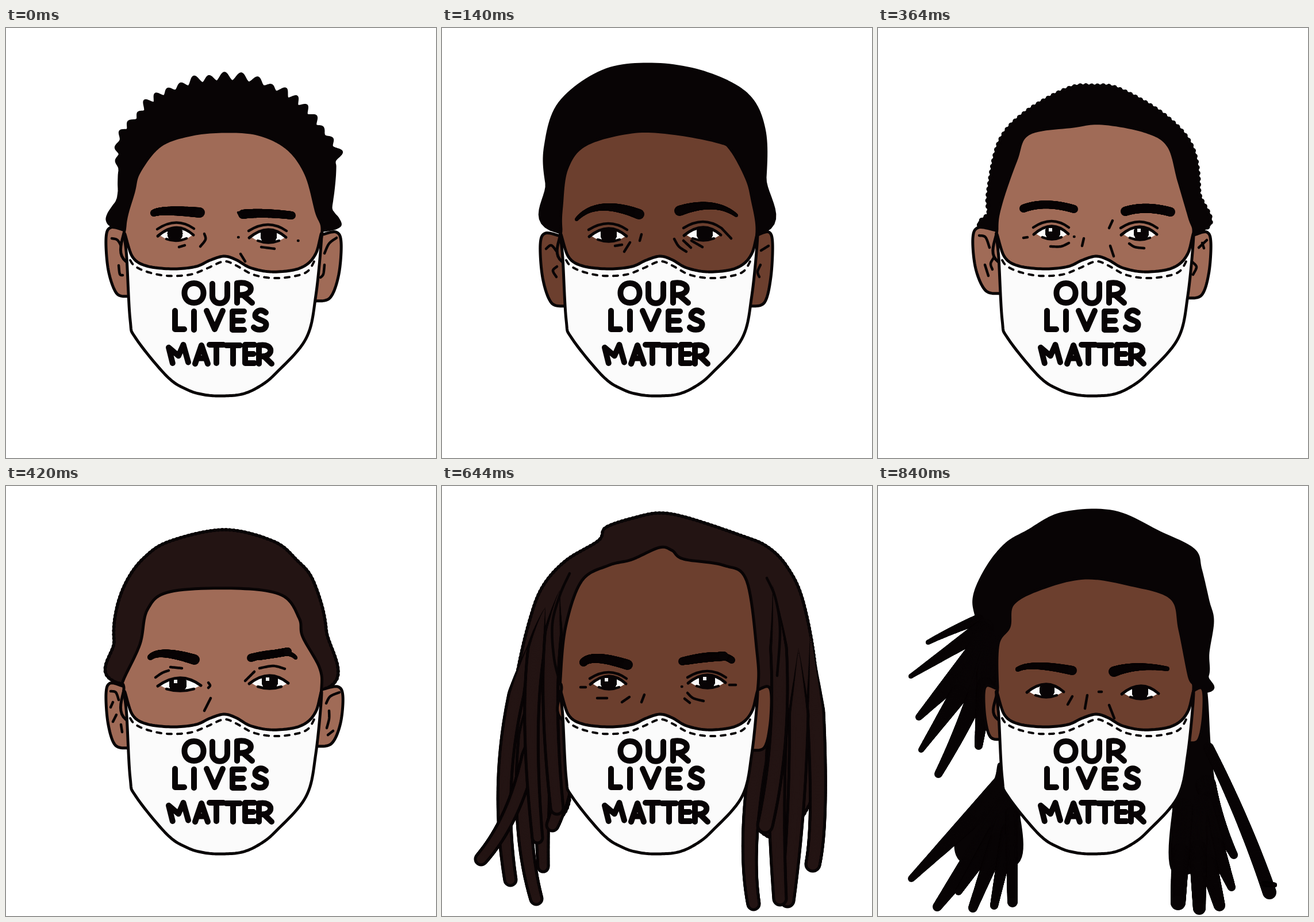
Recreate the animation shown at these times as an HTML page with a canvas. Size 748 px wide and 748 px high, loop 980 ms.

```html
<!DOCTYPE html>
<html lang="en">
<head>
<meta charset="utf-8">
<title>Our lives matter</title>
<style>
html, body { margin: 0; width: 100%; height: 100%; overflow: hidden; background: #fff; }
canvas { display: block; width: 748px; height: 748px; }
</style>
</head>
<body>
<canvas id="stage" width="748" height="748" role="img" aria-label="Masked faces: OUR LIVES MATTER"></canvas>
<script>
const ctx = document.getElementById('stage').getContext('2d');
const INK = '#080405', LIGHT = '#a06b57', DARK = '#6c3f2e', BROWN = '#231413';
const HOLD = 140;
let skin = LIGHT;

const parse = s => s.trim().split(/\s+/).map(p => p.split(',').map(Number));

// Dense samples of a smooth curve through the points
function sample(p, closed) {
  const n = p.length, out = [];
  const at = i => closed ? p[(i + n) % n] : p[Math.max(0, Math.min(n - 1, i))];
  for (let i = 0; i < (closed ? n : n - 1); i++) {
    const [a, b, c, d] = [at(i - 1), at(i), at(i + 1), at(i + 2)];
    for (let k = 0; k < 12; k++) {
      const t = k / 12;
      out.push([0, 1].map(j => b[j] + t / 2 * (c[j] - a[j] + t * (2 * a[j] - 5 * b[j] + 4 * c[j] - d[j]
        + t * (3 * b[j] - a[j] - 3 * c[j] + d[j])))));
    }
  }
  if (!closed) out.push(p[n - 1]);
  return out;
}

function trace(list, closed) {
  const path = new Path2D();
  list.forEach(q => path.lineTo(...q));
  if (closed) path.closePath();
  return path;
}

function stroke(path, width, dash = []) {
  ctx.lineWidth = width;
  ctx.strokeStyle = INK;
  ctx.setLineDash(dash);
  ctx.stroke(path);
  ctx.setLineDash([]);
}

function blob(path, color) {
  ctx.fillStyle = color;
  ctx.fill(path);
  stroke(path, 5);
}

function hair(s, color = INK, curl = 0) {
  const path = trace(sample(parse(s), true), true);
  blob(path, color);
  if (curl) stroke(path, curl, [.1, curl * 1.1]);
}

// Hair whose edge rises in seeded tufts above a height limit
function tufts(s, step, amp, limit, seed) {
  const list = sample(parse(s), true), out = [];
  const rnd = () => (seed = seed * 16807 % 2147483647) / 2147483647;
  let walked = 0, up = false;
  list.forEach(([x, y], i) => {
    const [nx, ny] = list[(i + 1) % list.length];
    const dx = nx - x, dy = ny - y, len = Math.hypot(dx, dy);
    walked += len;
    if (walked < step) return;
    walked = 0;
    up = !up;
    const h = up && y < limit ? amp * (.5 + rnd() * .7) : 0;
    out.push([x + dy / len * h, y - dx / len * h]);
  });
  blob(trace(sample(out, true), true), INK);
}

// Tapered stroke along a quadratic curve, radius r1 to r2
function taper(x1, y1, cx, cy, x2, y2, r1, r2, color = INK, lead = 0) {
  ctx.fillStyle = color;
  for (let i = 0; i <= 150; i++) {
    const t = i / 150, u = 1 - t;
    const r = (r1 + (r2 - r1) * t) * (lead ? Math.min(1, t / lead) : 1);
    ctx.beginPath();
    ctx.arc(u * u * x1 + 2 * u * t * cx + t * t * x2, u * u * y1 + 2 * u * t * cy + t * t * y2, r, 0, 7);
    ctx.fill();
  }
}

function strand(x1, y1, x2, y2, r1, r2, bow = 0) {
  taper(x1, y1, (x1 + x2) / 2 + bow, (y1 + y2) / 2, x2, y2, r1, r2);
}

function lock(x1, y1, cx, cy, x2, y2, r1, r2) {
  taper(x1, y1, cx, cy, x2, y2, r1 + 2.5, r2 + 2.5, INK, .25);
  taper(x1, y1, cx, cy, x2, y2, r1 - 2.5, r2 - 2.5, BROWN, .25);
}

function ear(x, y, out, bx, by) {
  const h = by - y, w = x - out;
  const p = [[x, y], [out + w * .25, y - 5], [out, y + h * .12], [out + w * .12, y + h * .6], [out + w * .55, y + h * .95], [bx, by]];
  blob(trace(sample(p)), skin);
}

function face(s) {
  blob(trace(sample(parse(s + ' 540,400 520,430 379,430 215,410'), true), true), skin);
}

function mark(...s) {
  for (const m of s) {
    const p = parse(m);
    if (!p[1]) p.push([p[0][0] + .5, p[0][1]]);
    stroke(trace(sample(p)), 4.5);
  }
}

function arc(x1, y1, cx, cy, x2, y2, path = new Path2D()) {
  path.moveTo(x1, y1);
  path.quadraticCurveTo(cx, cy, x2, y2);
  return path;
}

// Almond eye with lids; fold is the height of the crease, 0 for none
function eye(x1, y1, x2, y2, ix, r, fold, shine) {
  const mx = (x1 + x2) / 2, my = (y1 + y2) / 2;
  const white = arc(x1, y1, mx, my - 24, x2, y2);
  white.quadraticCurveTo(mx, my + 20, x1, y1);
  ctx.save();
  ctx.clip(white);
  ctx.fillStyle = '#fbfbfb';
  ctx.fillRect(x1, my - 30, x2 - x1, 60);
  taper(ix, my - 3, ix, my - 3, ix, my - 3, r, r);
  if (shine) taper(ix - 4, my - 7, ix - 4, my - 7, ix - 4, my - 7, 3, 3, '#eee');
  ctx.restore();
  stroke(arc(x1 - 4, y1 + 1, mx, my - 27, x2 + 1, y2), 5);
  stroke(arc(x1 + 11, y1 + 6, mx, my + 13, x2 - 11, y2 + 6), 4.5);
  if (fold) stroke(arc(x1 - 5, y1 - fold + 2, mx, my - fold - 20, x2 + 2, y2 - fold + 2), 4.5);
}

function tousled() {
  skin = LIGHT;
  tufts('204,350 197,290 198,235 201,192 222,167 250,137 285,114 330,99 380,93 435,98 480,117 515,143 545,178 567,207 572,245 565,310 552,352', 10, 12, 235, 77);
  ear(207, 352, 174, 212, 467);
  ear(548, 360, 583, 538, 475);
  mark('184,366 194,369 201,382 203,397', '196,413 198,428 203,430', '575,365 562,375 554,392', '554,412 552,428 547,434');
  face('207,345 222,285 232,250 268,205 320,186 380,180 440,185 490,210 522,255 540,320 550,350');
  taper(257, 322, 270, 315, 337, 321, 6, 9);
  taper(412, 324, 445, 320, 497, 326, 8, 7);
  mark('404,321 408,328');
  eye(268, 361, 325, 360, 294, 13, 13);
  eye(427, 364, 486, 364, 457, 14, 13);
  mark('301,381 311,378', '345,358 347,368 338,380', '444,381 467,384', '508,370', '404,364', '408,393 416,406');
}

function flatTop() {
  skin = DARK;
  hair('203,355 182,270 180,205 205,130 280,75 365,63 455,77 530,115 560,175 562,260 549,358');
  ear(206, 362, 171, 214, 484);
  ear(549, 360, 575, 536, 484);
  mark('181,384 190,378 199,388', '200,415 193,422 199,433', '555,387 568,379', '554,412 549,424 552,433');
  face('207,350 208,310 217,245 250,203 330,181 400,183 480,198 503,212 530,262 540,300 548,350');
  taper(234, 333, 268, 295, 343, 324, 3, 9);
  taper(413, 318, 475, 297, 512, 326, 9, 3);
  eye(260, 362, 320, 362, 290, 14, 13);
  eye(425, 360, 484, 360, 457, 14, 14);
  mark('301,379 313,377', '317,389 327,373', '347,359 344,370', '487,349 503,366', '404,367 412,380 425,389', '420,370 433,382', '434,370 453,381');
}

function closeCrop() {
  skin = LIGHT;
  hair('205,350 193,320 193,280 212,197 257,147 330,106 375,101 420,107 498,152 546,207 558,285 550,355', INK, 9);
  ear(205, 352, 165, 212, 462);
  ear(550, 360, 579, 538, 470);
  mark('176,361 187,364 194,382', '201,400 196,410 199,420', '186,412 192,431', '572,369 558,382', '564,374 567,383', '548,408 554,416 548,429');
  face('207,350 214,305 240,230 262,184 340,171 390,166 465,180 505,205 523,265 542,330 549,355');
  taper(253, 314, 290, 300, 341, 315, 7, 7);
  taper(430, 319, 465, 308, 509, 320, 8, 8);
  eye(275, 358, 330, 358, 304, 13, 13, true);
  eye(427, 359, 484, 359, 458, 13, 13, true);
  mark('253,365 260,364', '300,380 318,380 332,374', '341,363', '358,366 355,379', '402,348 408,335', '404,379 410,397', '437,375 447,381 463,383');
}

function rounded() {
  skin = LIGHT;
  hair('203,345 188,270 192,215 210,165 240,125 285,96 380,76 465,96 505,128 535,166 557,250 549,355', BROWN, 6);
  ear(203, 348, 174, 214, 456);
  ear(550, 354, 586, 540, 453);
  mark('182,357 191,359 196,372', '186,376 182,385', '192,398 186,410', '200,415 202,428', '580,359 564,366 557,378', '562,391 562,405 558,421', '569,426 560,433');
  face('205,350 204,338 233,275 246,215 285,184 400,178 480,190 510,230 516,262 545,315 549,350');
  taper(251, 298, 266, 283, 328, 302, 5, 9);
  taper(426, 299, 490, 281, 504, 299, 7, 3);
  taper(440, 296, 475, 291, 490, 288, 7, 7);
  eye(268, 347, 338, 347, 299, 15, 0, true);
  eye(427, 343, 490, 343, 459, 14, 0, true);
  mark('260,333 272,325 283,321', '286,315 306,317', '352,342 355,347 352,351', '345,391 356,369', '416,339 432,323', '441,317 465,313 485,318');
}

function longLocks() {
  skin = DARK;
  hair('210,400 222,545 180,590 122,565 106,480 130,330 152,235 175,175 215,130 272,95 285,72 335,55 380,47 430,56 520,86 565,105 600,140 628,200 650,320 657,480 636,560 585,615 532,560 550,400', BROWN, 6);
  lock(160, 255, 85, 470, 119, 685, 14, 10);
  lock(165, 320, 120, 560, 164, 718, 16, 10);
  lock(185, 290, 170, 500, 176, 662, 18, 9);
  lock(165, 390, 145, 560, 68, 649, 13, 10);
  lock(180, 210, 140, 340, 166, 612, 16, 9);
  lock(215, 330, 230, 500, 192, 590, 20, 10);
  lock(205, 180, 175, 320, 200, 560, 15, 11);
  lock(640, 250, 665, 560, 645, 658, 15, 12);
  lock(620, 280, 625, 520, 601, 721, 18, 11);
  lock(590, 300, 575, 500, 588, 718, 18, 11);
  lock(570, 370, 520, 600, 542, 727, 16, 10);
  lock(575, 170, 605, 400, 562, 590, 14, 13);
  mark('222,152 205,190 192,240 195,300 206,345', '565,160 580,195 588,250 583,330');
  ear(551, 354, 573, 540, 460);
  face('208,350 206,335 215,245 243,165 290,138 330,128 378,107 400,112 420,127 490,138 530,165 548,290 550,345');
  taper(246, 307, 260, 291, 323, 311, 7, 9);
  taper(418, 305, 485, 287, 504, 303, 7, 6);
  taper(425, 304, 460, 298, 490, 296, 7, 8);
  eye(262, 344, 319, 344, 290, 14, 11, true);
  eye(432, 342, 492, 342, 461, 14, 11, true);
  mark('241,350 250,350', '270,369 287,369', '313,376 326,367', '347,376 352,363', '500,346 511,346', '417,349', '427,360 437,369 455,374', '422,370 431,377');
}

function windswept() {
  skin = LIGHT;
  tufts('205,352 193,310 190,250 180,222 179,190 192,150 215,115 245,88 290,62 345,45 400,46 450,58 495,79 530,110 561,138 574,185 573,240 563,290 552,345', 13, 8, 270, 31);
  strand(185, 190, 156, 214, 14, 4);
  strand(210, 125, 182, 138, 12, 4);
  strand(262, 85, 252, 62, 16, 7);
  strand(345, 45, 350, 30, 8, 3);
  ear(207, 346, 178, 212, 452);
  ear(549, 357, 575, 538, 459);
  face('210,350 214,260 235,190 275,155 355,147 440,150 500,175 525,195 528,230 541,320 549,350');
  taper(260, 299, 300, 285, 335, 303, 4, 9);
  taper(420, 308, 455, 292, 496, 302, 8, 4);
  eye(265, 348, 325, 348, 294, 14, 14);
  eye(427, 347, 490, 347, 460, 14, 0);
  mark('450,323 475,325 490,335 498,343', '239,352 248,354', '243,364 252,359', '264,356 270,360', '357,338 360,345 356,349', '342,397 352,371', '502,354 516,351', '504,359 513,364', '410,385 415,402');
}

function ponytails() {
  skin = DARK;
  hair('205,350 195,300 172,230 168,190 191,140 223,101 260,79 320,48 410,45 490,81 549,111 561,145 574,200 582,235 574,290 573,330 549,360');
  strand(175, 232, 87, 272, 9, 4, -6);
  strand(185, 247, 57, 331, 16, 4);
  strand(190, 275, 71, 402, 25, 6);
  strand(190, 290, 75, 459, 24, 5);
  strand(195, 300, 105, 501, 20, 7, 10);
  strand(190, 320, 175, 452, 18, 7);
  hair('214,485 200,520 140,600 150,655 242,655 243,565');
  strand(222, 520, 58, 683, 22, 6);
  strand(222, 570, 103, 732, 26, 8);
  strand(222, 580, 140, 706, 18, 6);
  strand(222, 585, 165, 734, 18, 8);
  strand(228, 600, 202, 730, 14, 7);
  strand(232, 570, 234, 724, 11, 9);
  hair('518,540 545,440 568,350 577,460 590,570 598,640 514,670');
  strand(575, 455, 681, 707, 9, 12, 10);
  strand(672, 692, 690, 694, 5, 4);
  strand(570, 520, 619, 642, 18, 7, -8);
  strand(560, 560, 615, 698, 24, 7);
  strand(553, 580, 594, 730, 22, 10);
  strand(555, 580, 559, 735, 18, 11);
  strand(530, 560, 522, 725, 18, 13);
  ear(205, 352, 184, 214, 441);
  ear(549, 356, 567, 541, 447);
  face('208,350 209,275 228,245 235,205 285,178 360,160 440,172 510,195 525,250 541,330 549,350');
  taper(243, 319, 265, 306, 338, 321, 4, 8);
  taper(410, 323, 450, 309, 503, 318, 9, 4);
  eye(263, 358, 322, 358, 294, 13, 0);
  eye(428, 361, 487, 361, 456, 14, 0);
  mark('330,380 338,366', '360,387 364,364', '384,358 389,358', '402,381 411,404');
}

// Letter strokes in a box from -1 to 1
const GLYPHS = {
  O: 'M0 -1C1.3 -1 1.3 1 0 1C-1.3 1 -1.3 -1 0 -1',
  U: 'M-1 -1V.2C-1 1.25 1 1.25 1 .2V-1',
  R: 'M-1 1V-1C1.4 -1.3 1.4 .3 -.7 .2M-.2 .2L1 1',
  L: 'M-1 -1V1H1',
  I: 'M0 -1V1',
  V: 'M-1 -1L0 1L1 -1',
  E: 'M1 -1H-1V1H1M-1 0H.8',
  S: 'M.9 -.8C-.2 -1.5 -1.3 -.5 -.5 -.2C.2 .1 1.2 .1 .9 .7C.6 1.2 -.6 1.1 -1 .8',
  M: 'M-.6 1L-1 -.7L0 .2L.5 -1L1 .9',
  A: 'M-1 1L0 -1L1 1M-.6 .4H.6',
  T: 'M-1 -1H1M0 -1V1'
};

function word(text, y, h, places) {
  [...text].forEach((ch, i) => {
    const [x, w] = places[i], path = new Path2D();
    path.addPath(new Path2D(GLYPHS[ch]), new DOMMatrix().translate(x, y + i % 2).scale(w, h));
    stroke(path, 10);
  });
}

function mask() {
  const edge = '206,357 220,398 245,414 290,419 330,415 355,404 379,397 400,403 425,417 460,424 500,421 525,410 540,390 549,360 539,465 522,540 470,600 440,624 410,637 375,640 345,638 315,629 280,606 226,540 216,508 210,400';
  blob(trace(sample(parse(edge), true), true), '#fbfbfb');
  const seam = '216,404 224,414 245,424 280,431 320,429 350,418 379,406 400,413 430,429 465,435 500,432 525,423 539,400';
  stroke(trace(sample(parse(seam))), 4, [8, 10]);
  word('OUR', 461, 17, [[327, 17], [372, 13], [415, 13]]);
  word('LIVES', 508, 16, [[302, 8], [327, 1], [363, 14], [404, 10], [442, 11]]);
  word('MATTER', 567, 16, [[300, 17], [340, 11], [366, 12], [395, 12], [424, 8], [451, 11]]);
}

const faces = [tousled, flatTop, closeCrop, rounded, longLocks, windswept, ponytails];

function draw() {
  ctx.fillStyle = '#fff';
  ctx.fillRect(0, 0, 748, 748);
  ctx.lineCap = ctx.lineJoin = 'round';
  faces[Math.floor(performance.now() / HOLD) % faces.length]();
  mask();
  requestAnimationFrame(draw);
}
draw();
</script>
</body>
</html>
```
